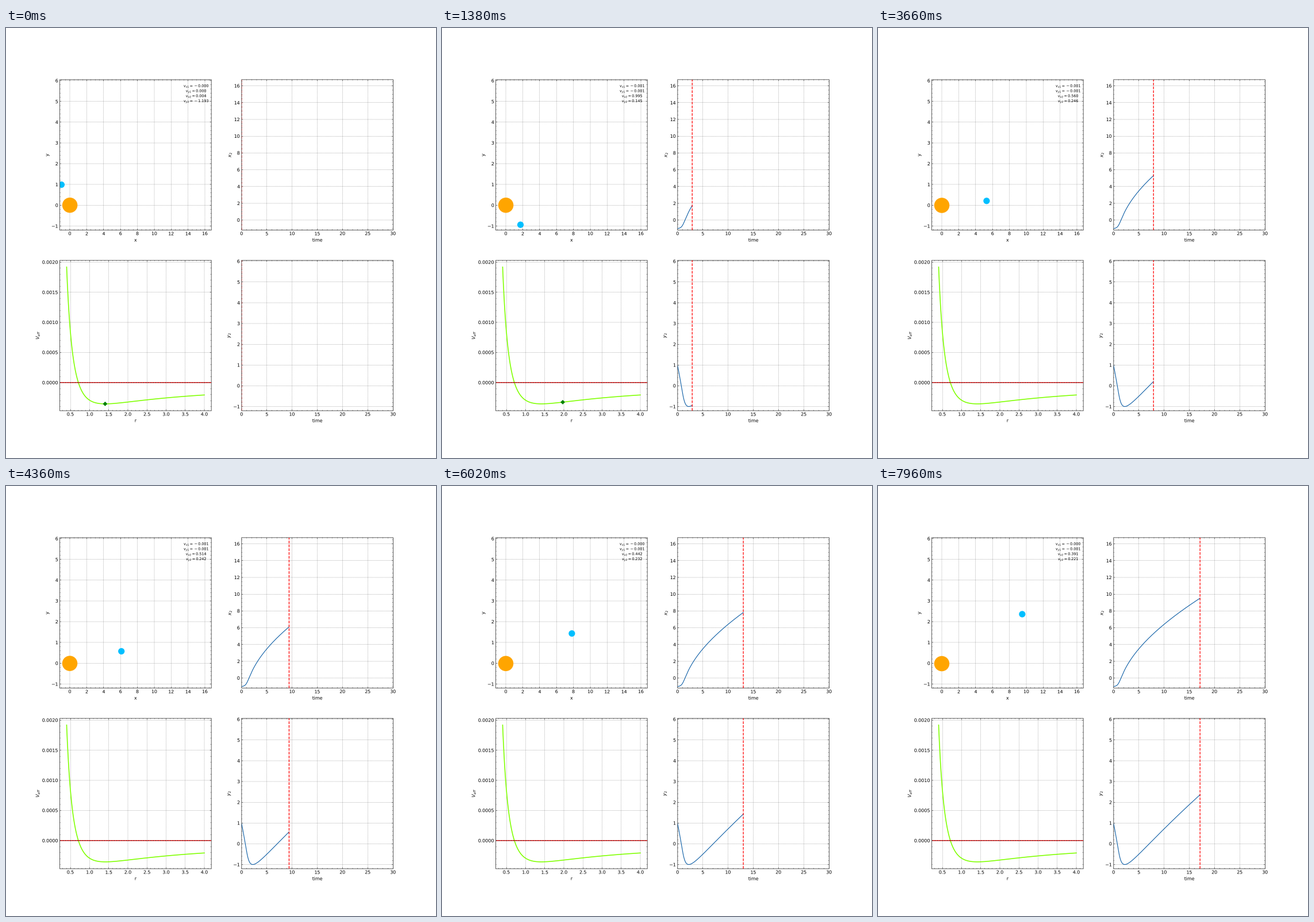
A matplotlib script that plays this animation: 748 by 748 pixels, repeating every 8000 ms.

```python
import numpy as np
import matplotlib.pyplot as plt
from matplotlib.animation import FuncAnimation
from matplotlib.patches import Circle, PathPatch, RegularPolygon
from matplotlib.textpath import TextPath
from matplotlib.ticker import MultipleLocator
from matplotlib.transforms import Affine2D

SIZE, DPI, FINE = 748, 64, 4
PT = 72 / DPI  # points per pixel

plt.rcParams.update({
    "font.family": "DejaVu Sans", "font.size": 9, "axes.labelpad": 3.6,
    "axes.linewidth": 0.72, "axes.axisbelow": True, "axes.grid": True,
    "grid.color": "k", "grid.alpha": 0.5, "grid.linestyle": "--",
    "grid.linewidth": 0.45, "text.hinting": "none",
})
for side, twin in (("xtick", "top"), ("ytick", "right")):
    plt.rcParams.update({
        f"{side}.direction": "in", f"{side}.{twin}": True,
        f"{side}.minor.visible": True, f"{side}.major.pad": 3.15,
        f"{side}.major.size": 2.7, f"{side}.minor.size": 1.35,
        f"{side}.major.width": 0.6, f"{side}.minor.width": 0.5,
    })

# Two bodies under gravity, the light one on an escape orbit
M1, M2 = 1.0, 0.001
V0 = 2 ** 0.25
STEP, SUB, LAST = 0.1002, 10, 173


def slope(s):
    p1, p2, v1, v2 = s
    d = p2 - p1
    pull = d / np.hypot(*d) ** 3
    return np.array([v1, v2, M2 * pull, -M1 * pull])


def advance(s, h):
    a = slope(s)
    b = slope(s + h / 2 * a)
    c = slope(s + h / 2 * b)
    d = slope(s + h * c)
    return s + h / 6 * (a + 2 * b + 2 * c + d)


state = advance(np.array([[0, 0], [-1, 1], [0, 0], [0, -V0]], float), 0.01)
states = [state]
for _ in range(LAST * SUB):
    state = advance(state, STEP / SUB)
    states.append(state)
states = np.array(states)
times = np.arange(len(states)) * STEP / SUB


def v_eff(r):
    return M2 * (V0 ** 2 / (2 * r ** 2) - M1 / r)


fig, ((orbit, x_plot), (well, y_plot)) = plt.subplots(
    2, 2, figsize=(SIZE / DPI, SIZE / DPI), dpi=DPI)
fig.subplots_adjust(left=0.125, right=0.9, bottom=0.11, top=0.88,
                    wspace=0.2, hspace=0.2)
panels = (orbit, x_plot, well, y_plot)


def setup(ax, xlabel, ylabel, xstep, ystep, xlim=None, ylim=None):
    ax.set_xlabel(xlabel)
    ax.set_ylabel(ylabel)
    ax.xaxis.set_major_locator(MultipleLocator(xstep))
    ax.yaxis.set_major_locator(MultipleLocator(ystep))
    if xlim:
        ax.set(xlim=xlim, ylim=ylim)


X_RANGE, Y_RANGE, T_RANGE = (-1.2, 16.75), (-1.2, 6.05), (0, 30)
setup(orbit, "x", "y", 2, 1, X_RANGE, Y_RANGE)
setup(x_plot, "time", "$x_2$", 5, 2, T_RANGE, X_RANGE)
setup(y_plot, "time", "$y_2$", 5, 1, T_RANGE, Y_RANGE)

radii = np.linspace(0.4, 4, 400)
static = well.plot(radii, v_eff(radii), color="chartreuse", lw=1.6 * PT)
static.append(well.axhline(0, color="red", lw=1.4 * PT))
static.append(well.axhline(0, color="k", lw=0.8 * PT, ls="--", alpha=0.8))
setup(well, "r", "$V_{eff}$", 0.5, 0.0005)
well.set(xlim=well.get_xlim(), ylim=well.get_ylim())

# Render the fixed axes once, finely, and average down to a backdrop
fig.set_dpi(DPI * FINE)
fig.canvas.draw()
fine = np.asarray(fig.canvas.buffer_rgba()).astype(float)
backdrop = fine.reshape(SIZE, FINE, SIZE, FINE, 4).mean(axis=(1, 3))
fig.set_dpi(DPI)
for ax in panels:
    ax.set_axis_off()
for artist in static:
    artist.set_visible(False)
fig.figimage(backdrop.round().astype(np.uint8), 0, 0, origin="upper",
             zorder=-1)


def add(ax, patch):
    """Add a shape whose own units are pixels."""
    patch.set_zorder(3)
    return ax.add_artist(patch)


def place(patch, ax, x, y):
    px, py = ax.transData.transform((x, y))
    patch.set_transform(Affine2D().translate(px, py))


heavy = add(orbit, Circle((0, 0), 13.25, fc="orange", lw=0))
light = add(orbit, Circle((0, 0), 5.6, fc="deepskyblue", lw=0))
gem = add(well, RegularPolygon((0, 0), 4, radius=3.95, fc="green", lw=0))


def text_shape(text):
    path = TextPath((0, 0), text, size=6.4)
    box = path.get_extents()
    return path.transformed(Affine2D().translate(-(box.x0 + box.x1) / 2, 0))


labels = []
for row in range(4):
    spot = Affine2D().translate(330.7, SIZE - 102.8 - 8.75 * row)
    patch = PathPatch(text_shape("0"), fc="k", lw=0)
    patch.set_transform(spot)
    labels.append(add(orbit, patch))

traces = [ax.plot([], [], color="#0C5DA5", lw=1.1 * PT, snap=False)[0]
          for ax in (x_plot, y_plot)]
cursors = [ax.axvline(0, color="red", ls="--", lw=1.25 * PT, snap=False)
           for ax in (x_plot, y_plot)]


def sample(frame):
    """Three quick steps, then a rest, every seven ticks."""
    k, tick = divmod(frame + 1, 7)
    if k >= 56:
        return 3 * k
    if k >= 41:
        return 3 * k + min(tick, 1)
    return 3 * k - 1 + min(tick, 2)


def update(frame):
    n = sample(frame) * SUB
    p1, p2, v1, v2 = states[n]
    place(heavy, orbit, *p1)
    place(light, orbit, *p2)
    r = np.hypot(*(p2 - p1))
    place(gem, well, r, v_eff(r))
    names = ("x1", "y1", "x2", "y2")
    for label, name, v in zip(labels, names, (*v1, *v2)):
        label.set_path(text_shape(f"$v_{{{name}}} = {v:.3f}$"))
    for axis, (trace, cursor) in enumerate(zip(traces, cursors)):
        trace.set_data(times[:n + 1], states[:n + 1, 1, axis])
        cursor.set_xdata([times[n]] * 2)
    return [heavy, light, gem, *labels, *traces, *cursors]


anim = FuncAnimation(fig, update, frames=400, interval=20,
                     init_func=lambda: update(0), repeat=True,
                     repeat_delay=0, cache_frame_data=False)
plt.show()
```
